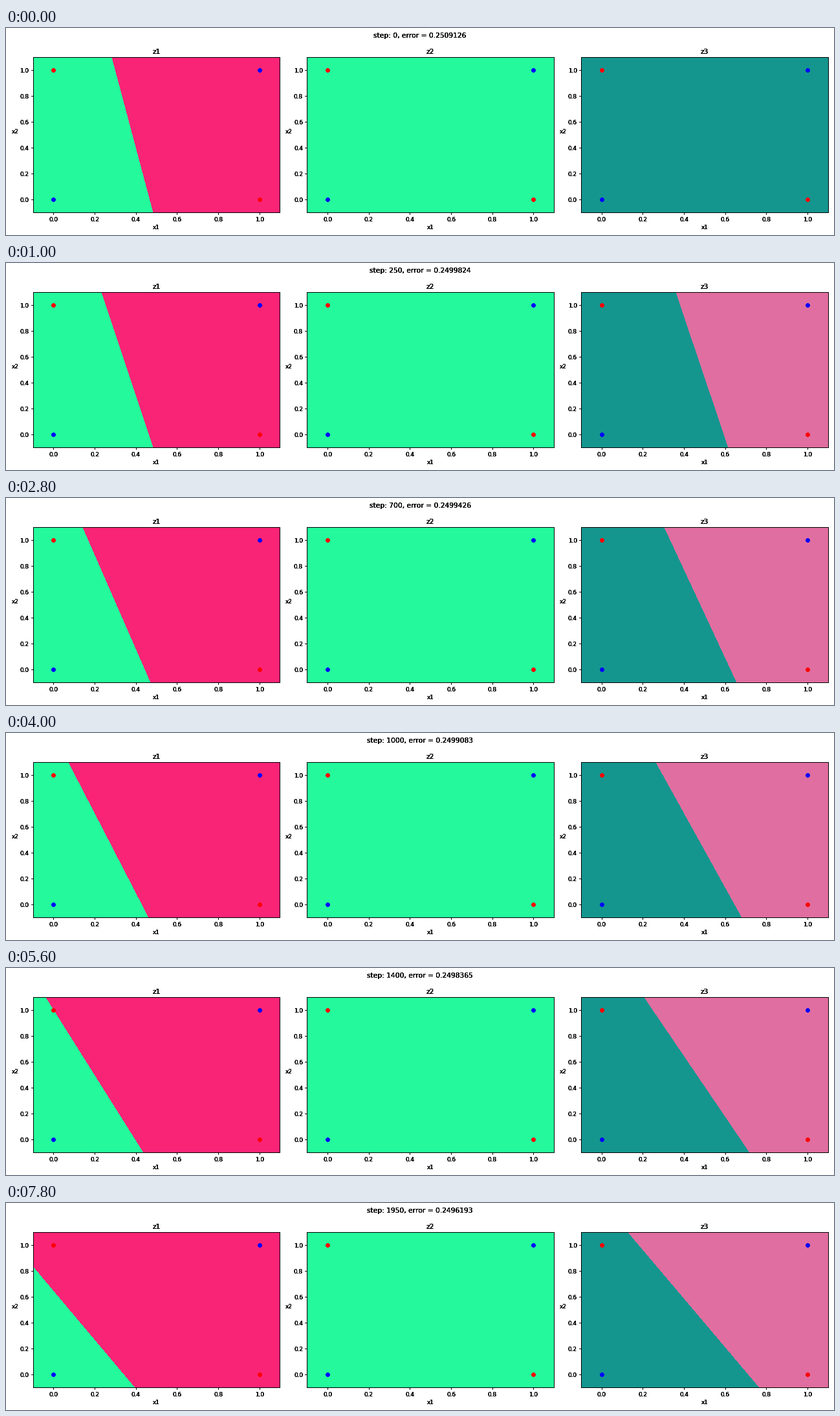
Write a matplotlib script that moves like this. It is 1280 px wide and 320 px high and loops after 8 s.

```python
import numpy as np
import matplotlib.pyplot as plt
from matplotlib.animation import FuncAnimation
from matplotlib.patches import Polygon

DPI = 64
W, H = 1280, 320
FRAMES, INTERVAL, STEP = 40, 200, 50
LAYERS = 4  # overdrawn text and lines give the heavy, hard-edged look

LIME, ROSE = "#24fa9c", "#fa2477"
TEAL, PINK = "#14968f", "#e06ea0"

LOW, HIGH = -0.1, 1.1
BOX_W, BOX_H = 381.8, 240
LEFT, GAP, BOTTOM = 41.6, 423.6, 34.6

# Deviation of the error from 1/4, in millionths, against thousands of steps.
gain = np.poly1d(np.polyfit([0.25, 0.7, 1.0, 1.4, 1.6, 1.95],
                            [17.6, 57.4, 91.7, 163.5, 219.9, 380.7], 5))


def error(t):
    start = 912.6 + gain(0)
    return 0.25 + (start * np.exp(-t / 0.015) - gain(t)) * 1e-6


def z1_edge(t):
    """Top and bottom of the edge, in pixels from the panel's left side."""
    return 122.4 - 64 * t + 5.2 * t**2 - 8.2 * t**3, 186.4 - 7.4 * t**2


def z3_edge(t):
    shift = 300 * np.exp(-t / 0.03)
    return 156.7 - 38.4 * t - 2.2 * t**2 + shift, 220.8 + 28.6 * t + shift


def region(top, bottom):
    """Area to the right of the slanted edge."""
    x_top, x_bottom = (LOW + px / BOX_W * (HIGH - LOW) for px in (top, bottom))
    far = 10
    return [(x_top, HIGH), (far, HIGH), (far, LOW), (x_bottom, LOW)]


def add_axes(fig, index):
    ax = fig.add_axes([(LEFT + index * GAP) / W, BOTTOM / H, BOX_W / W, BOX_H / H])
    ax.set(xlim=(LOW, HIGH), ylim=(LOW, HIGH), facecolor="none")
    ax.set_title(f"z{index + 1}")
    ax.set_xlabel("x1")
    ax.set_ylabel("x2", rotation=0, labelpad=8.5)
    ax.scatter([0, 1], [0, 1], color="blue", zorder=2)
    ax.scatter([0, 1], [1, 0], color="red", zorder=2)
    return ax


def panel(fig, index, back, front):
    base, *_ = [add_axes(fig, index) for _ in range(LAYERS)]
    base.set_facecolor(back)
    return base.add_patch(Polygon(region(0, 0), facecolor=front, lw=0,
                                  antialiased=False, zorder=1))


fig = plt.figure(figsize=(W / DPI, H / DPI), dpi=DPI, facecolor="white")
z1_area = panel(fig, 0, LIME, ROSE)
panel(fig, 1, LIME, LIME)
z3_area = panel(fig, 2, TEAL, PINK)
headings = [fig.text(0.5, 0.977, "", size=12, ha="center", va="top")
            for _ in range(LAYERS)]


def draw(frame):
    step = frame * STEP
    t = step / 1000
    z1_area.set_xy(region(*z1_edge(t)))
    z3_area.set_xy(region(*z3_edge(t)))
    for heading in headings:
        heading.set_text(f"step: {step}, error = {error(t):.7f}")
    return z1_area, z3_area, *headings


anim = FuncAnimation(fig, draw, frames=FRAMES, interval=INTERVAL, repeat=True,
                     repeat_delay=0, blit=False)
plt.show()
```
